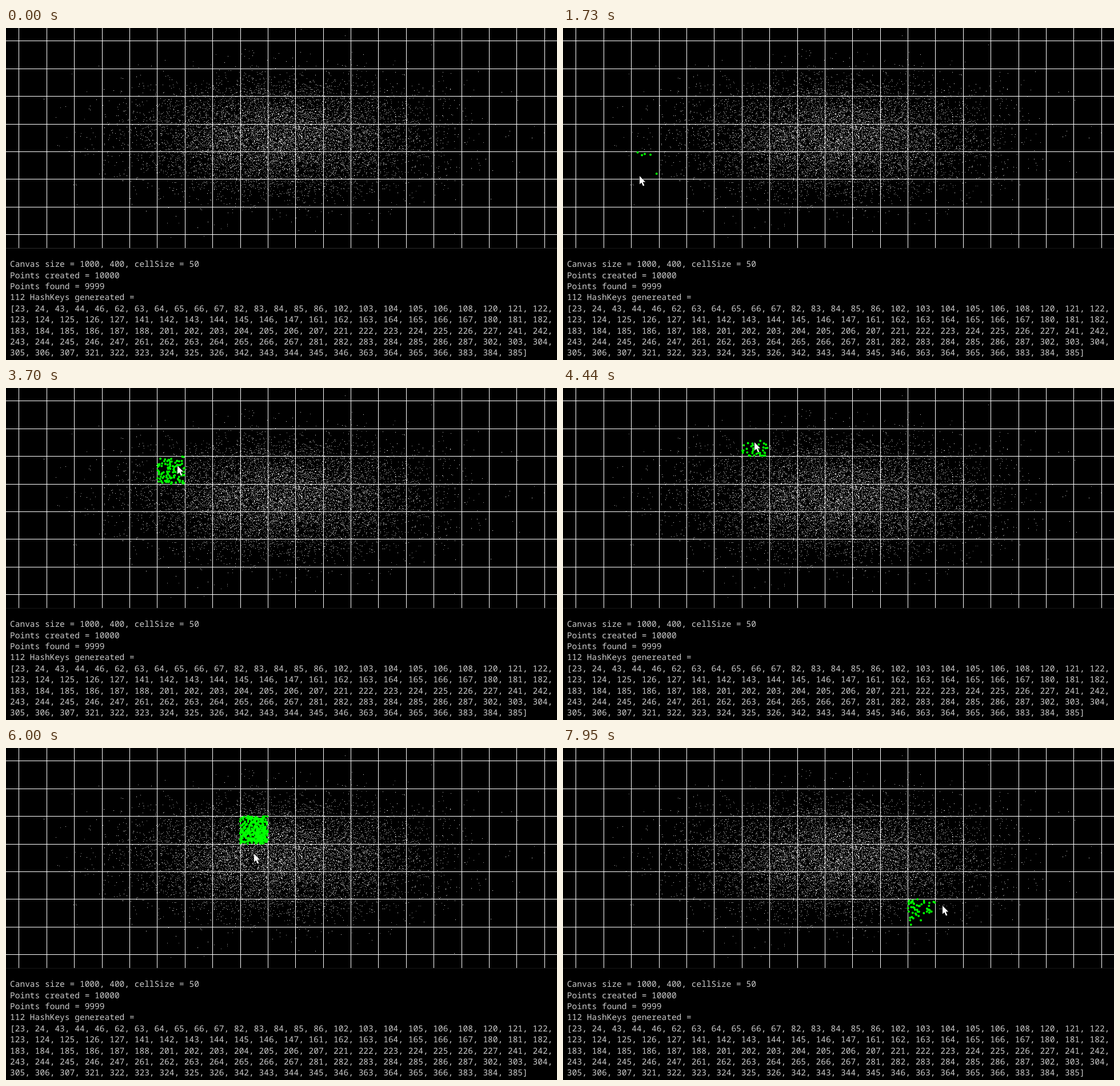
Write an HTML page with a canvas that moves like this. It is 964x581 px and loops after 8 s.

```html
<!DOCTYPE html>
<html lang="en">
<head>
<meta charset="utf-8">
<title>Spatial hash</title>
<style>
  html, body { margin: 0; width: 100%; height: 100%; overflow: hidden; background: #000; }
  canvas, svg { position: absolute; left: 0; top: 0; width: 964px; height: 581px; }
  text {
    font: 14.52px "Noto Sans Mono", "DejaVu Sans Mono", monospace;
    fill: #ccc;
    white-space: pre;
    text-rendering: geometricPrecision;
  }
  #divider { fill: #2b2b2b; animation: dim 8s linear infinite; }
  @keyframes dim {
    0%, 6.25% { fill: #2b2b2b; }
    15.8%, 100% { fill: #161616; }
  }
</style>
</head>
<body>
<canvas id="field" width="964" height="581"></canvas>
<canvas id="overlay" width="964" height="581"></canvas>
<svg id="log" viewBox="0 0 964 581"><rect id="divider" y="385" width="964" height="1"/></svg>
<script>
const LOOP = 8000, CELL = 48.385, ORIGIN = 22.48, FIELD_HEIGHT = 385;
const ENTER = 500, HIGHLIGHT_LAG = 60;
const field = document.getElementById('field').getContext('2d');
const overlay = document.getElementById('overlay').getContext('2d');
const log = document.getElementById('log');

const lines = `Canvas size = 1000, 400, cellSize = 50
Points created = 10000
Points found = 9999
112 HashKeys genereated =
[23, 24, 43, 44, 46, 62, 63, 64, 65, 66, 67, 82, 83, 84, 85, 86, 102, 103, 104, 105, 106, 108, 120, 121, 122,
123, 124, 125, 126, 127, 141, 142, 143, 144, 145, 146, 147, 161, 162, 163, 164, 165, 166, 167, 180, 181, 182,
183, 184, 185, 186, 187, 188, 201, 202, 203, 204, 205, 206, 207, 221, 222, 223, 224, 225, 226, 227, 241, 242,
243, 244, 245, 246, 247, 261, 262, 263, 264, 265, 266, 267, 281, 282, 283, 284, 285, 286, 287, 302, 303, 304,
305, 306, 307, 321, 322, 323, 324, 325, 326, 342, 343, 344, 345, 346, 363, 364, 365, 366, 383, 384, 385]`;

lines.split('\n').forEach((line, i) => {
  const label = document.createElementNS('http://www.w3.org/2000/svg', 'text');
  label.setAttribute('x', 7);
  label.setAttribute('y', 418.4 + 19.36 * i);
  label.textContent = line;
  log.append(label);
});

let seed = 20177;
function random() {
  seed = (seed + 0x6D2B79F5) | 0;
  let h = Math.imul(seed ^ (seed >>> 15), 1 | seed);
  h = (h + Math.imul(h ^ (h >>> 7), 61 | h)) ^ h;
  return ((h ^ (h >>> 14)) >>> 0) / 4294967296;
}

const cellIndex = v => Math.floor((v - ORIGIN) / CELL);
const hashKey = (x, y) => cellIndex(x) + ',' + cellIndex(y);
const cells = new Map();

function addPoint(x, y) {
  const key = hashKey(x, y);
  if (!cells.has(key)) cells.set(key, []);
  cells.get(key).push([x, y]);
  field.globalAlpha = 0.45 + 0.55 * random();
  field.fillRect(Math.floor(x), Math.floor(y), 1, 1);
}

// Normally distributed points, 2.5 times wider than high
field.fillStyle = '#fff';
for (let i = 0; i < 10000; i++) {
  const radius = 48.4 * Math.sqrt(-2 * Math.log(1 - random()));
  const angle = 2 * Math.PI * random();
  const y = 191.5 + radius * Math.sin(angle);
  if (y < FIELD_HEIGHT) addPoint(482 + 2.5 * radius * Math.cos(angle), y);
}

field.globalAlpha = 1;
for (let i = 0; i < 20; i++) {
  const at = Math.round(ORIGIN + CELL * i);
  field.fillRect(at, 0, 1, FIELD_HEIGHT);
  if (at < FIELD_HEIGHT) field.fillRect(0, at, 964, 1);
}

// Pointer stops: time, x, y
const path = [
  [ENTER, 52, 373], [1270, 86, 312], [1420, 108, 288], [1580, 108, 288], [1670, 131, 262],
  [1730, 134, 259], [2390, 192, 190], [2600, 192, 190], [2850, 190, 121], [3010, 190, 121],
  [3700, 300, 136], [3940, 300, 136], [4690, 352, 74], [4750, 369, 54], [4980, 418, 36],
  [5210, 418, 36], [5900, 430, 150], [6000, 434, 185], [6600, 466, 266], [6820, 495, 269],
  [7540, 624, 276], [7790, 624, 276], [7950, 664, 276], [LOOP, 664, 276]
];

function pointerAt(t) {
  const next = path.findIndex(stop => stop[0] > t);
  const [t0, x0, y0] = path[next - 1], [t1, x1, y1] = path[next];
  const k = (t - t0) / (t1 - t0);
  return [Math.round(x0 + (x1 - x0) * k), Math.round(y0 + (y1 - y0) * k)];
}

function drawHighlight(points) {
  overlay.fillStyle = '#0f0';
  overlay.beginPath();
  for (const [x, y] of points) {
    overlay.moveTo(x + 2, y);
    overlay.arc(x, y, 2, 0, 2 * Math.PI);
  }
  overlay.fill();
}

const arrow = new Path2D('M0 0V14.5L3.3 11.4L6 17.6L8.4 16.5L5.7 10.5H10.2Z');

function drawPointer(x, y) {
  overlay.save();
  overlay.translate(x, y);
  overlay.strokeStyle = '#000';
  overlay.stroke(arrow);
  overlay.fillStyle = '#fff';
  overlay.fill(arrow);
  overlay.restore();
}

function draw(t) {
  overlay.clearRect(0, 0, 964, 581);
  if (t < ENTER) return;
  const sensed = pointerAt(Math.max(ENTER, t - HIGHLIGHT_LAG));
  drawHighlight(cells.get(hashKey(...sensed)) || []);
  drawPointer(...pointerAt(t));
}

const begin = performance.now();
function tick() {
  draw((performance.now() - begin) % LOOP);
  requestAnimationFrame(tick);
}
tick();
</script>
</body>
</html>
```
